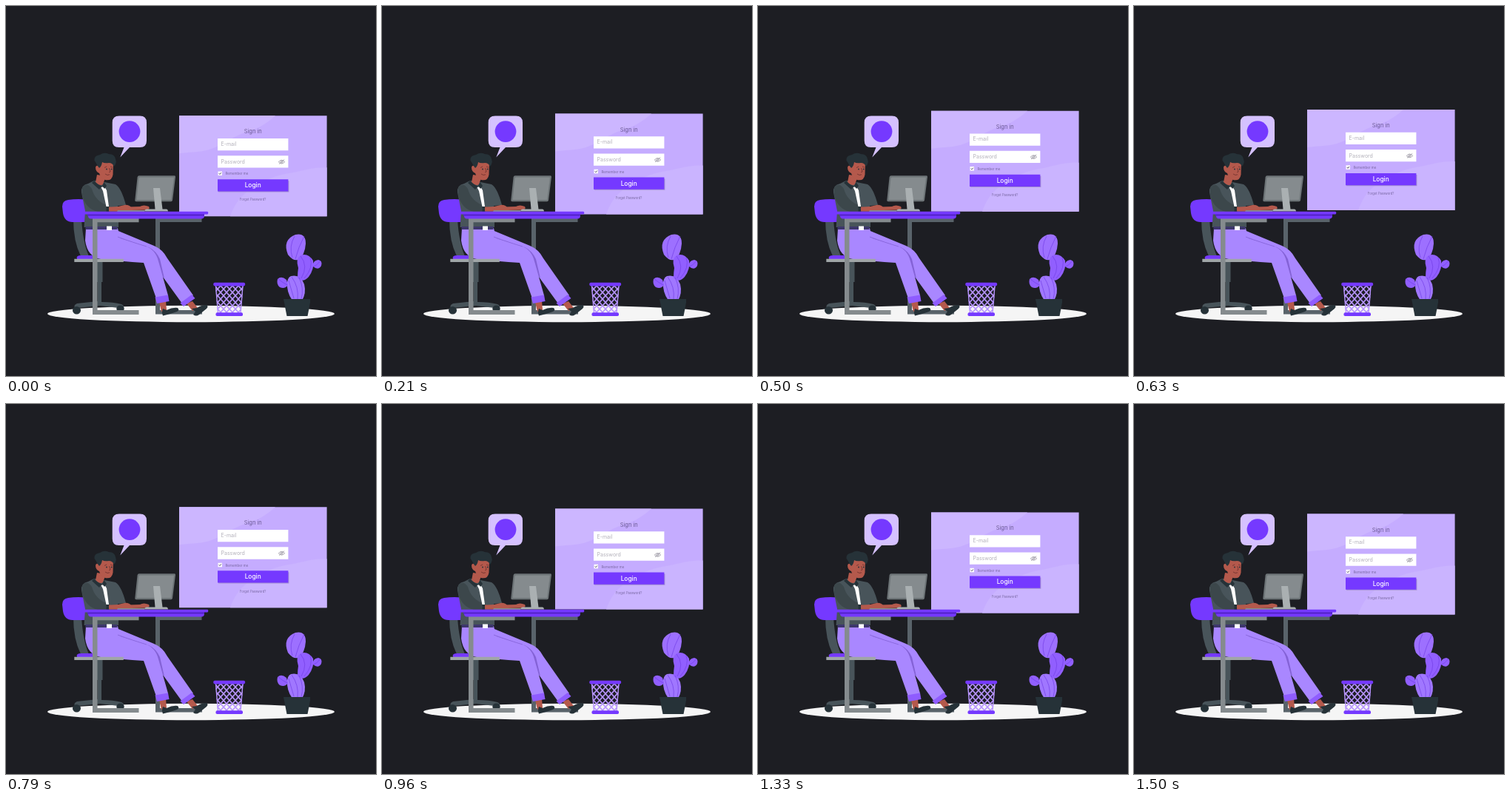
An HTML page for the animation above (1.54 s loop, 500 px wide and 500 px high).

```html
<!DOCTYPE html>
<html lang="en">
<head>
<meta charset="utf-8">
<title>Sign in</title>
<style>
  html, body { margin: 0; width: 100%; height: 100%; overflow: hidden; background: #1d1e23; }
  svg { display: block; width: 100%; height: 100%; }
  text { font-family: Inter, sans-serif; }
  .mid { text-anchor: middle; }
  .violet { fill: #7539ff; }
  .lilac { fill: #a987ff; }
  .ink { fill: #263238; }
  .slate { fill: #48545a; }
  .skin { fill: #b4594c; }
  .steel { fill: #858b8e; }
  .hint { fill: #b3b0ba; }
  .vein { fill: none; stroke: #7340e6; stroke-width: .7; }
</style>
</head>
<body>
<svg viewBox="0 0 500 500">
  <defs>
    <pattern id="mesh" width="8" height="9" patternUnits="userSpaceOnUse" x="282" y="378">
      <path d="M-1-1.1L9 10.1M9-1.1L-1 10.1" stroke="#b794ff" stroke-width="1.7"/>
    </pattern>
  </defs>
  <ellipse cx="250" cy="416" rx="194" ry="11.2" fill="#f5f5f5"/>

  <g id="panel" transform="translate(234 148.3)">
    <path fill="#c5acff" d="M0 0H199.6V136H0z"/>
    <path fill="#ccb6ff" d="M0 0H130C116 13 104 18 91 22C70 29 57 41 40 46C25 50 12 49 0 51z"/>
    <path fill="#cab4ff" d="M199.6 70C182 69 168 74 153 77C128 80 111 90 94 101C80 111 73 124 69 136H199.6z"/>
    <text class="mid" x="99.7" y="24" font-size="7.5" fill="#6d5c94">Sign in</text>
    <path fill="#a48fd2" d="M53 88H148.4V103.2H53z"/>
    <path fill="#fff" d="M52 30.7H147.4V47H52zM52 54H147.4V70.3H52zM52.5 75.3h5.5v5.5h-5.5z"/>
    <path class="violet" d="M52 86H147.4V102.2H52z"/>
    <text class="hint" x="56.5" y="40.8" font-size="7">E-mail</text>
    <text class="hint" x="56.5" y="64.5" font-size="7">Password</text>
    <g fill="none" stroke="#96929f" stroke-width=".8">
      <path d="M134.3 62.4Q138.5 57.6 142.7 62.4Q138.5 67 134.3 62.4zM135 65.3L142.2 59.2"/>
      <circle cx="138.5" cy="62.3" r="1.5"/>
    </g>
    <path d="M53.8 78l1.1 1.2 2-2.3" fill="none" stroke="#453b58" stroke-width=".9"/>
    <text x="62.5" y="80.2" font-size="4.5" fill="#77669f">Remember me</text>
    <text class="mid" x="99.7" y="97" font-size="8.4" font-weight="500" fill="#fff">Login</text>
    <text class="mid" x="99.7" y="115.2" font-size="4.2" fill="#77669f">Forgot Password?</text>
  </g>

  <path fill="#d5c1ff" d="M153 148.4H181Q190 148.4 190 157.4V182Q190 191 181 191H167L154.3 204.5L159.5 191H152.5Q143.7 191 143.7 182V157.4Q143.7 148.4 153 148.4z"/>
  <circle class="violet" cx="167" cy="169.6" r="14.4"/>

  <g id="chair">
    <path class="slate" fill="#3d494e" d="M91 288H102Q104 320 112 338H101Q91 318 91 288z"/>
    <path class="violet" d="M84 262Q95 260.5 108 261.5V292H90Q79 292 77 280L76 271Q76 263 84 262zM96 342Q94 337 102 337H120V342z"/>
    <path class="slate" d="M121 346H130.5V373H129V400Q145 400 156 403Q160 405 159 408H152L127 405L96 408H93Q91 404 96 402L124 399V373H121z"/>
    <ellipse class="ink" cx="95.5" cy="411.3" rx="5.5" ry="5.2"/>
    <ellipse class="ink" cx="154.5" cy="409" rx="5.2" ry="4.5"/>
  </g>

  <path fill="#59636a" d="M202 287H264.5V292H208V411H265V416.5H202z"/>

  <g id="legs">
    <path class="skin" d="M207 400L216 398L217 411L210 413zM244 402L252 399L259 408L252 412z"/>
    <path class="ink" d="M212 409L217 411Q225 407 232 408Q235 411 231 413L222 416L212 418.5Q210 414 212 409zM251 409L258 408Q264 404 271 404Q274 406 271 409L261 417Q257 420 253 417L256 413z"/>
    <path class="lilac" d="M147 302L200 324Q212 329 218 341L253 391L238 402L196 344L150 325z"/>
    <path fill="#8462d6" d="M152 313L193 326Q203 331 208 342L214 368L205 358L197 335z"/>
    <path class="lilac" d="M108 300H151L154 314L188 324Q202 329 206 345L219 391L203 395L186 347Q155 345 128 342Q110 339 107 317z"/>
    <path fill="none" stroke="#8462d6" stroke-width=".8" d="M151 312Q173 320 190 325"/>
    <path fill="#8f5cff" d="M201.5 393.5L219 390.5L220.5 399L204 402zM235.5 401.5L251 390L255.5 395L240 406z"/>
  </g>
  <path fill="#a0a6a8" d="M92.3 341.8H158.8V346H92.3z"/>

  <g id="person">
    <path class="slate" fill="#4d575a" d="M119 236L111 240Q101 242 102 252L107 277L105.5 299H152V279L151 270L162 269Q156 246 148 241L133 238z"/>
    <path fill="#3c474b" d="M103 246Q109 237 116 247Q120 264 140 271V278H124Q107 274 103 255z"/>
    <path fill="#3d376b" d="M107.5 298H150.5V302H107.5z"/>
    <path fill="#fff" d="M136 297.5H143V303H136zM128.5 245L133 244L136 249L139 271L135.5 271L131 250z"/>
    <path class="ink" d="M135.5 271H139.5V278H135.5z"/>
    <path class="skin" d="M123 228L135 230L131 241Q127 244 121 238zM139 271.5Q151 272 160 269Q166 268 170 273L169 277.5H139zM165 271.5L181 271Q186 268 193 271Q195 274 191 275.5L169 276z"/>
    <path class="ink" d="M119 236Q125 243 130 243L126 248L116 239zM130 243L132.5 238L136 243L133 247z"/>
    <path class="skin" d="M125 208Q135 206 145 212L144.5 228Q143 237 134 235Q128 233 126 226Q121 224 121 218Q122 214 126 217z"/>
    <path class="ink" d="M126 219L123 215Q122 212 119.5 209Q118.5 202 127 201Q133 197 139 200Q147 200 148 207Q150 212 146 217Q144 212 139 212Q133 213 130 211Q129 217 126 219z"/>
    <path d="M133 218.5l3.2-1.6M141 217l3 1.2M139.5 219l1.6 5-2 .6M134 227q3 2.5 6 .8" fill="none" stroke="#6e302e" stroke-width=".8"/>
    <circle class="ink" cx="136" cy="220.5" r=".9"/>
    <circle class="ink" cx="142.7" cy="220.5" r=".9"/>
  </g>

  <g id="computer">
    <path fill="#6d7477" d="M180 229.3H227.5Q229.4 229.3 229 231.3L225 262.5Q224.6 264.3 223 264.3H176Q174 264.3 174.3 262.3L177.6 231.3Q178 229.3 180 229.3z"/>
    <path class="steel" d="M181 231.5H227L223.2 262H176.5L179.5 232.5z"/>
    <path fill="#aab0b2" d="M199 246H208L211.5 274.5H217Q219 275 219 277.5H187Q187 275 190 274.5H201.5z"/>
    <path class="steel" d="M151 276H187V278H150z"/>
  </g>

  <path class="steel" d="M117 287H179.5V292.3H123.5V411H179.5V417H117z"/>
  <path fill="#5222c5" d="M110 281H268V284H110z"/>
  <path class="violet" d="M106 277.7H272Q273.3 277.7 273.3 279.5T272 281.5H106Q104.7 281.5 104.7 279.5T106 277.7zM111 283.4H268Q268 287.5 264 287.5H115Q111 287.5 111 283.4z"/>

  <path fill="url(#mesh)" d="M283 378H320.5L317.5 415H286z"/>
  <path d="M283.5 378L286.5 415M320 378L317 415" stroke="#b794ff" stroke-width="1.4"/>
  <rect class="violet" x="280.3" y="373.8" width="42.8" height="4.6" rx="1.8"/>
  <rect class="violet" x="283.5" y="414.3" width="36.5" height="4.7" rx="1.8"/>

  <g id="cactus">
    <path fill="#9d70ff" d="M391 309Q405 306 405 321Q404 337 395 343Q388 345 381 336Q373 316 391 309z"/>
    <path fill="#a077ff" d="M385 365Q398 362 403 376Q406 388 400 398H387Q379 387 380 373Q381 367 385 365z"/>
    <path fill="#915fff" d="M398 337Q408 333 415 344Q417 355 409 366Q401 375 394 367Q394 360 395 354Q391 342 398 337zM415 352Q414 344 422 343Q428 344 426 351Q422 358 415 352zM381 377Q377 383 370 380Q365 376 367 369Q372 364 379 370z"/>
    <path class="vein" d="M403 311Q395 326 391 342M390 311Q382 325 387 340M398 338Q409 351 399 368M411 340Q416 353 403 368M424 345Q421 350 416 352M368 369Q374 374 380 377M386 366Q396 380 394 396M396 367Q403 381 399 396M382 371Q386 385 389 395"/>
    <path class="ink" d="M375 396H411V401L407.5 419H379.5L376 401z"/>
  </g>
</svg>
<script>
  const LOOP = 1540, FPS = 24, HALF = 760, LOWEST_TIME = 735, TOP = 138.6, RISE = 10;
  const panel = document.getElementById('panel');

  // Linear float up and down, stepped at 24 frames per second.
  function draw(now) {
    const frame = Math.floor((now % LOOP + 5) * FPS / 1000);
    const t = Math.min(frame, 36) * 1000 / FPS;
    const away = Math.abs(t - LOWEST_TIME);
    const y = TOP + RISE * Math.min(away, 2 * HALF - away) / HALF;
    panel.setAttribute('transform', `translate(234 ${y.toFixed(2)})`);
    requestAnimationFrame(draw);
  }
  draw(0);
</script>
</body>
</html>
```
